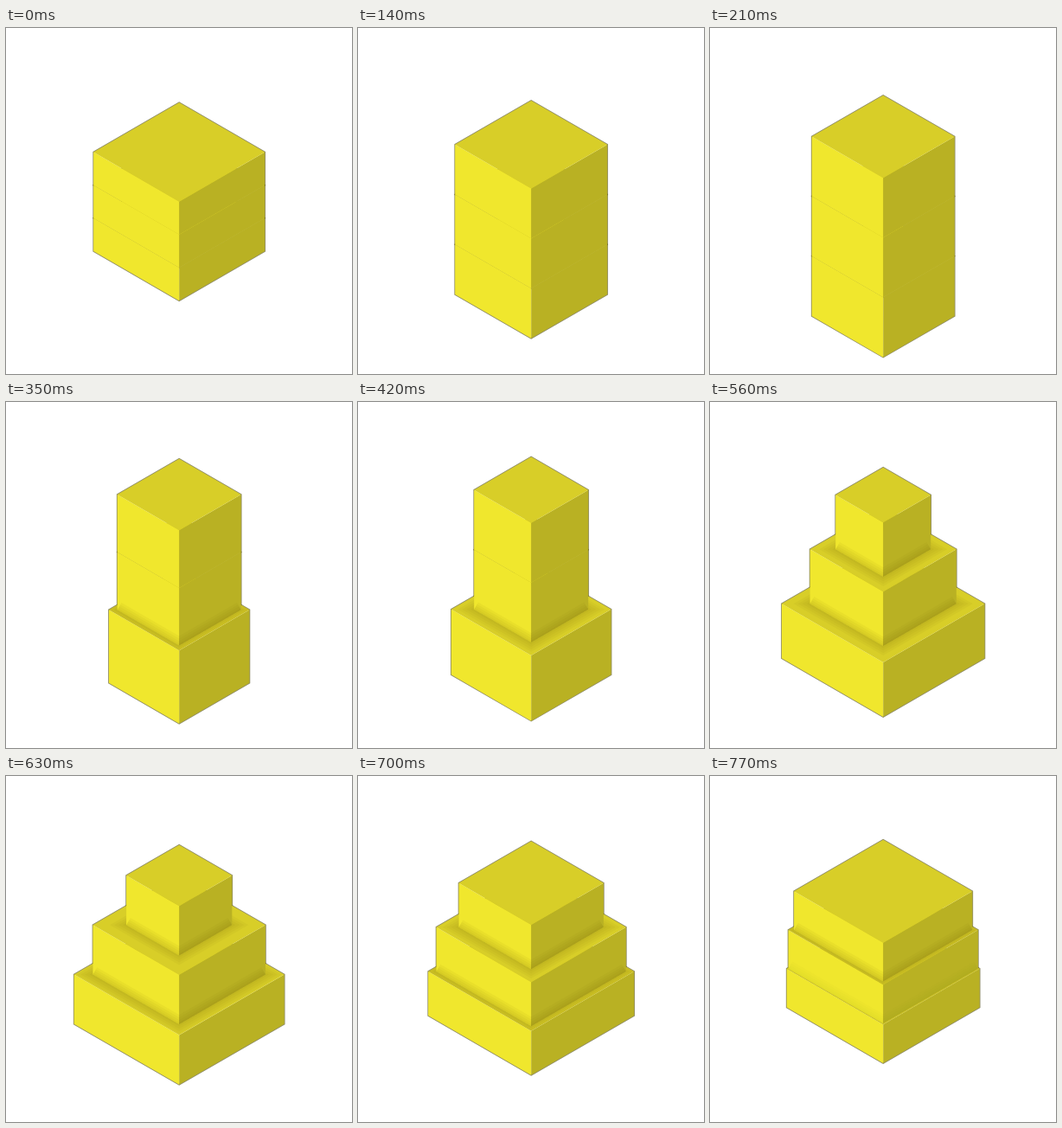
These frames come from a looping animation (400x400 px, 0.84 s). An HTML page with a canvas:

```html
<!DOCTYPE html>
<html lang="en">
<head>
<meta charset="utf-8">
<title>Stacked boxes</title>
<style>
  html, body { margin: 0; width: 100%; height: 100%; overflow: hidden; background: #fff; }
  canvas { display: block; }
</style>
</head>
<body>
<canvas id="stage" width="400" height="400"></canvas>
<script>
const ctx = document.getElementById('stage').getContext('2d');
const CX = 200.2, SLOPE = Math.tan(Math.PI / 6);
const STEP = 70, STEPS = 12, REST = 99;

// Bottom to top: step of the narrowest pose, then step and half width of the widest
const layers = [
  { low: 4, high: 9, peak: 121.5 },
  { low: 6, high: 10.5, peak: 111 },
  { low: 8.2, high: 11.5, peak: 106 }
];

const mix = (a, b, u) => a + (b - a) * u;
const smooth = u => (1 - Math.cos(Math.PI * u)) / 2;

// Shrinks steadily, swells smoothly, then drops back to rest
function halfWidth(t, { low, high, peak }) {
  if (t < low) return REST - 5.5 * t;
  if (t < high) return mix(REST - 5.5 * low, peak, smooth((t - low) / (high - low)));
  return mix(peak, REST, ((t - high) / (STEPS - high)) ** 2);
}

const groundAt = t => 258 + Math.min(25 * t, 9.55 * (STEPS - t));

function topAt(t) {
  const turn = 6.7;
  return t < turn
    ? mix(143.5, 100.5, smooth(t / turn))
    : mix(100.5, 143.5, ((t - turn) / (STEPS - turn)) ** 1.3);
}

function stackAt(t) {
  const ground = groundAt(t), height = ground - topAt(t);
  const foot = 1 / 3 + 0.055 * Math.exp(-((t - 5) ** 2));
  let y = ground;
  return layers.map((layer, i) => {
    const h = height * (i ? (1 - foot) / 2 : foot);
    y -= h;
    return { w: halfWidth(t, layer), y, h };
  });
}

function trace(points, close = true) {
  ctx.beginPath();
  points.forEach(([x, y]) => ctx.lineTo(CX + x, y));
  if (close) ctx.closePath();
}

function fill(points, color) {
  trace(points);
  ctx.fillStyle = color;
  ctx.fill();
}

function diamond(w, y) {
  const d = w * SLOPE;
  return [[0, y - d], [w, y], [0, y + d], [-w, y]];
}

function side(dir, { w, y, h }) {
  const d = w * SLOPE;
  return [[0, y + d], [dir * w, y], [dir * w, y + h], [0, y + d + h]];
}

function outline({ w, y, h }) {
  const d = w * SLOPE;
  return [[0, y - d], [w, y], [w, y + h], [0, y + d + h], [-w, y + h], [-w, y]];
}

function drawFaces(box) {
  fill(side(-1, box), '#f0e72d');
  fill(side(1, box), '#b9b123');
  fill(diamond(box.w, box.y), '#d8ce28');
}

// Soft shade along a seam, kept inside one shape
function shade(area, seam, close, strength) {
  ctx.save();
  trace(area);
  ctx.clip();
  trace(seam, close);
  ctx.strokeStyle = `rgba(120, 110, 10, ${0.06 * strength})`;
  for (let width = 4; width <= 19; width += 5) {
    ctx.lineWidth = width;
    ctx.stroke();
  }
  ctx.restore();
}

function draw(boxes) {
  ctx.fillStyle = '#fff';
  ctx.fillRect(0, 0, 400, 400);
  ctx.lineWidth = 1.7;
  ctx.strokeStyle = 'rgba(85, 80, 22, .65)';
  for (const box of boxes) {
    trace(outline(box));
    ctx.stroke();
  }
  boxes.forEach((box, i) => {
    const below = boxes[i - 1];
    const ledge = below ? below.w - box.w : 0;
    const strength = Math.max(0, Math.min(1, ledge / 6));
    const seam = below && diamond(box.w, below.y);
    if (strength) shade(diamond(below.w, below.y), seam, true, strength);
    drawFaces(box);
    if (strength) shade(outline(box), seam.slice(1), false, strength);
  });
}

function tick() {
  draw(stackAt(Math.floor(performance.now() / STEP) % STEPS));
  requestAnimationFrame(tick);
}
tick();
</script>
</body>
</html>
```
